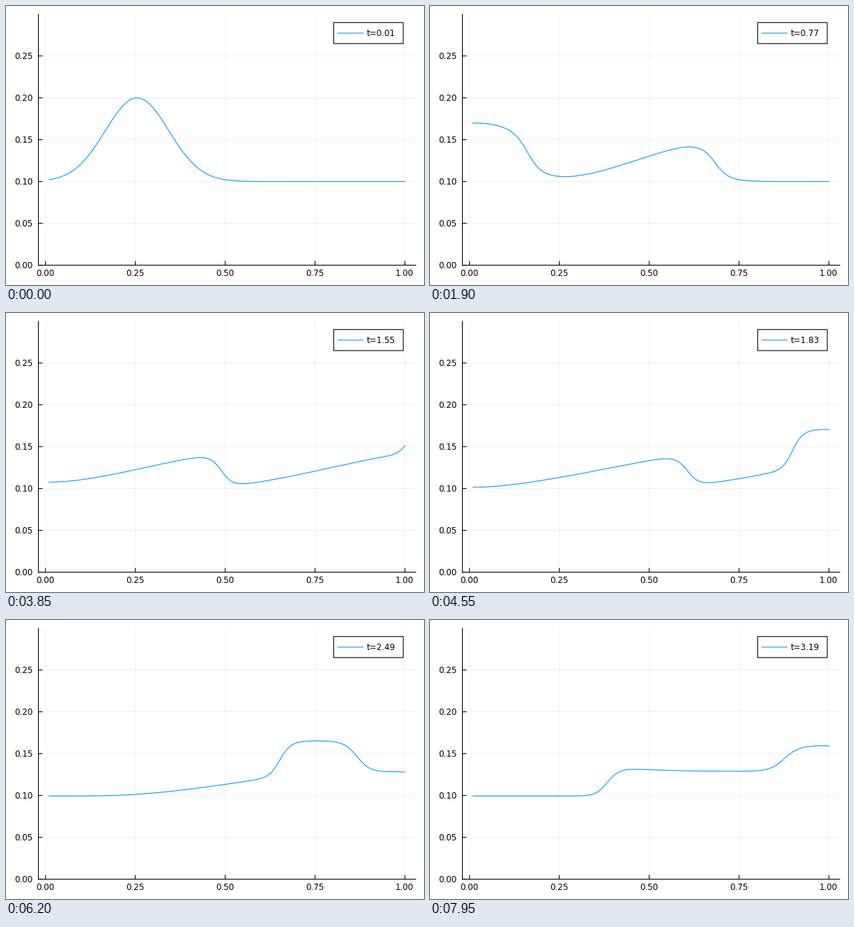
Recreate the animation shown at these times as a matplotlib script. Size 600 by 400 pixels, loop 8000 ms.

```python
import numpy as np
import matplotlib.pyplot as plt
from matplotlib.animation import FuncAnimation
from matplotlib.patches import Rectangle

W, H, DPI = 600, 400, 100
PT = 72 / DPI                      # points per pixel
FRAMES, INTERVAL = 160, 50
CELLS, DX, DT, G = 100, 0.01, 0.01, 1.0
BLUE = "#009AFA"


def flux(h, q):
    return np.array([q, q * q / h + G * h * h / 2])


def roe(h, q):
    """Roe flux at every inner face."""
    u, root = q / h, np.sqrt(h)
    um = (root[:-1] * u[:-1] + root[1:] * u[1:]) / (root[:-1] + root[1:])
    c = np.sqrt(G * (h[:-1] + h[1:]) / 2)
    dh, dq = np.diff(h), np.diff(q)
    fast, slow = um + c, um - c
    wf = np.abs(fast) * (dq - slow * dh) / (2 * c)
    ws = np.abs(slow) * (fast * dh - dq) / (2 * c)
    f = flux(h, q)
    jump = np.array([wf + ws, wf * fast + ws * slow])
    return (f[:, :-1] + f[:, 1:] - jump) / 2


def wall(h, q):
    """Pressure on a wall from the cell beside it, q pointing away."""
    return G * h * h / 2 - np.sqrt(G * h) * q / 2


def step(h, q):
    face = np.zeros((2, CELLS + 1))
    face[:, 1:-1] = roe(h, q)
    face[1, 0] = wall(h[0], q[0])
    face[1, -1] = wall(h[-1], -q[-1])
    return np.array([h, q]) - DT / DX * np.diff(face)


def simulate():
    centre = (np.arange(CELLS) + 0.5) * DX
    h = 0.1 + 0.1 * np.exp(-64 * (centre - 0.25) ** 2)
    q = np.zeros(CELLS)
    out = []
    for n in range(2 * FRAMES):
        if n % 2 == 0:
            out.append(h)
        h, q = step(h, q)
    return out


waves = simulate()
x = np.arange(1, CELLS + 1) * DX

fig = plt.figure(figsize=(W / DPI, H / DPI), dpi=DPI, facecolor="white")
ax = fig.add_axes([0, 0, 1, 1])
ax.set_xlim(0, W)
ax.set_ylim(H, 0)
ax.axis("off")

LEFT, RIGHT, TOP, BOTTOM = 46.5, 588.2, 11.8, 371.6


def px(v):
    return 56.6 + 516 * v


def py(v):
    return BOTTOM - 1200 * v


def line(xs, ys, color="black", width=1.1, **kw):
    return ax.plot(xs, ys, color=color, lw=width * PT, snap=False, **kw)[0]


def label(xp, yp, s, ha):
    return ax.text(xp, yp, s, ha=ha, va="baseline", fontsize=12 * PT,
                   family="DejaVu Sans", color="black")


for v in np.arange(5) * 0.25:
    line([px(v)] * 2, [TOP, BOTTOM], alpha=0.1, width=0.55)
    line([px(v)] * 2, [BOTTOM, BOTTOM - 5.4])
    label(px(v) - 0.4, 387, f"{v:.2f}", "center")
for v in np.arange(6) * 0.05:
    line([LEFT, RIGHT], [py(v)] * 2, alpha=0.1, width=0.55)
    line([LEFT, LEFT + 5.4], [py(v)] * 2)
    label(38.9, py(v) + 4.4, f"{v:.2f}", "right")
line([LEFT, LEFT], [TOP, BOTTOM])
line([LEFT, RIGHT], [BOTTOM, BOTTOM])

curve = line(px(x), py(waves[0]), BLUE)

ax.add_patch(Rectangle((470.4, 23.7), 99.8, 30.2, facecolor="white",
                       edgecolor="black", lw=1.1 * PT, snap=False, zorder=4))
line([476.5, 512.5], [38.9, 38.9], BLUE, zorder=5)
clock = label(518, 43.4, "", "left")
clock.set_zorder(5)


def update(k):
    curve.set_ydata(py(waves[k]))
    clock.set_text(f"t={0.01 + 0.02 * k:.2f}")
    return curve, clock


anim = FuncAnimation(fig, update, frames=FRAMES, interval=INTERVAL,
                     repeat=True, repeat_delay=0)
plt.show()
```
